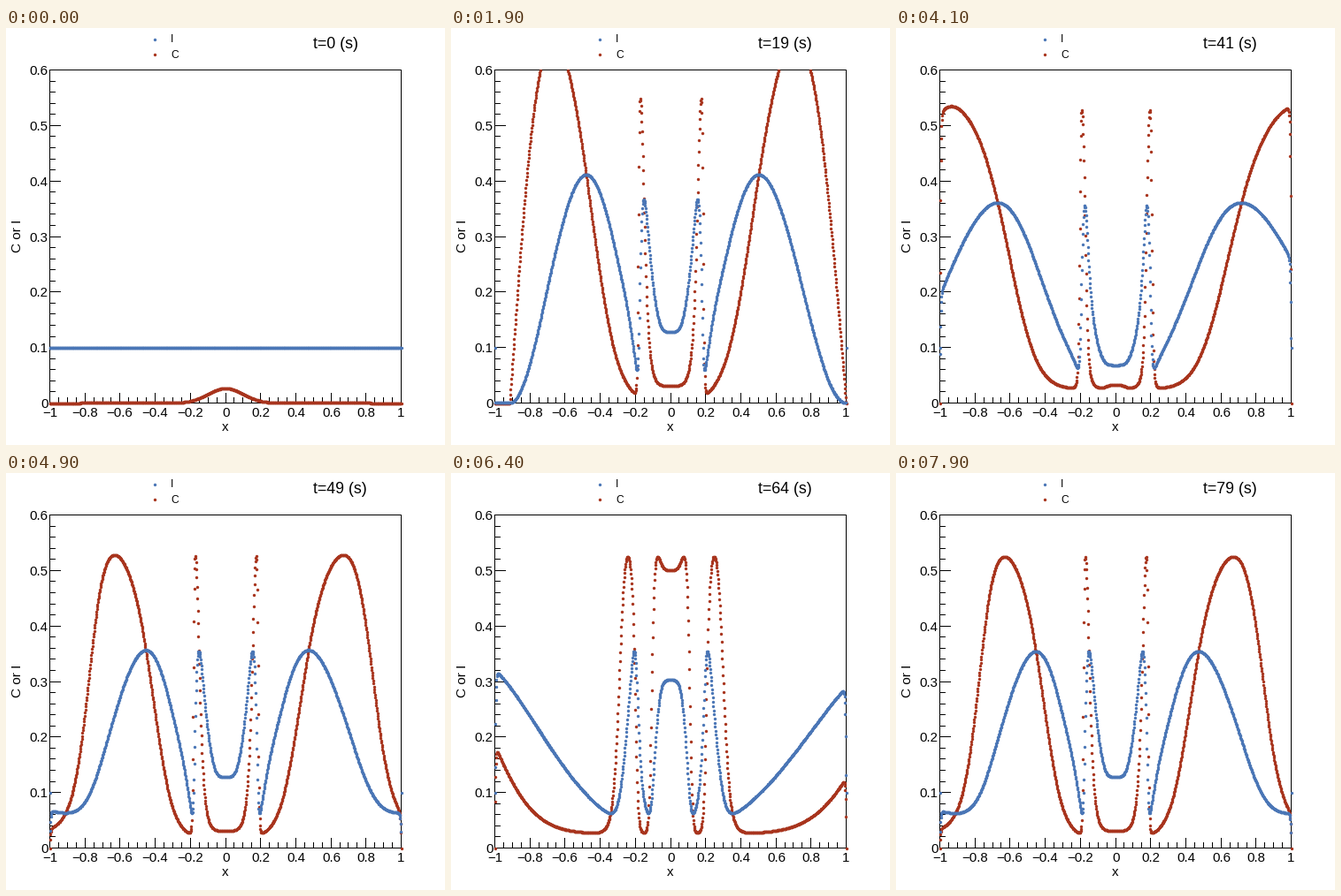
These frames come from a looping animation (496 by 472 pixels, 8000 ms). A matplotlib script:

```python
import numpy as np
import matplotlib.pyplot as plt
from matplotlib.animation import FuncAnimation

W, H, DPI = 496, 472, 100
BLUE, RED = "#4a76b6", "#a8341d"
FRAMES, SUB = 80, 10
PERIOD, RATE = 10, 0.46
FLOOR = .0265


def sigmoid(u):
    return 1 / (1 + np.exp(-np.clip(u, -60, 60)))


def delay(r):
    """Lag of the pulse at distance r: logarithmic outside a fast core."""
    far = 11.38 + 5.1 * np.log((r ** 4 + .086 ** 4) ** .25)
    return far - 5.4 * sigmoid((.182 - r) / .018)


def train(age, start, gain=0):
    """Periodic pulses, the first ones stronger by the given gain."""
    n, phase = np.divmod(age + 3, PERIOD)
    phase -= 3
    pulse = .548 * sigmoid((phase + 1.12) / .3) * sigmoid((1.95 - phase) / .75)
    boost = 1 + gain * 3. ** (start - np.maximum(n, start))
    return np.where(n >= start, pulse * boost, 0)


def first_pulse(age):
    """Strong pulse with a sharp front running into the empty region."""
    rise = np.tanh(np.maximum(age + 1.93, 0))
    base = .015 + (FLOOR - .015) * sigmoid((age - 8.3) / .3)
    return rise * (base + .82 * sigmoid((1.3 - age) / .95))


x = np.linspace(-1, 1, 1001)
grid = np.linspace(0, 1.1, 400)
stretch = grid * (1 + .11 * np.maximum(grid - .08, 0))
dist = np.where(x > 0, np.interp(x, stretch, grid), -x)
peak = delay(dist) + PERIOD
seed = np.exp(-50 * x ** 2)
rim = np.arange(len(x))
edge = 1 - np.exp(-.6 * np.minimum(rim, rim[::-1]))


def c_at(t):
    age = t - peak
    warm = FLOOR + train(age, 0)
    cold = first_pulse(age) + train(age, 1, .06)
    return (cold + seed * (warm - cold)) * edge


def simulate():
    """I relaxes towards C at every point."""
    dt = 1 / SUB
    keep = np.exp(-RATE * dt)
    inh = np.full_like(x, .1)
    out = []
    for n in range((FRAMES - 1) * SUB + 1):
        if n % SUB == 0:
            out.append((c_at(n * dt), inh.copy()))
        c = c_at((n + .5) * dt)
        inh = c + (inh - c) * keep
        inh[[0, -1]] = .1
    return out


states = simulate()

X0, X1, Y0, Y1 = 49.5, 446.5, 424.5, 47.5


def px(v):
    return (X0 + X1) / 2 + v * (X1 - X0) / 2


def py(v):
    return Y0 + (Y1 - Y0) * v / .6


fig = plt.figure(figsize=(W / DPI, H / DPI), dpi=DPI, facecolor="white")
ax = fig.add_axes([0, 0, 1, 1])
ax.set(xlim=(0, W), ylim=(H, 0))
ax.axis("off")


def text(tx, ty, s, size, ha="center", **kw):
    return ax.text(tx, ty, s, fontsize=size * 72 / DPI, ha=ha,
                   family="Liberation Sans", color="black", **kw)


def line(xs, ys):
    ax.plot(xs, ys, color="black", lw=72 / DPI, zorder=1, snap=False,
            solid_capstyle="projecting", solid_joinstyle="miter")


def dots(color, z, xs=(), ys=()):
    return ax.plot(xs, ys, "o", color=color, ms=3.4 * 72 / DPI, mew=0,
                   zorder=z)[0]


line([X0, X1, X1, X0, X0], [Y0, Y0, Y1, Y1, Y0])
for n in range(31):
    y = np.floor(py(n * .02)) + .5
    line([X0, X0 + (6 if n % 5 else 12)], [y, y])
    if n % 5 == 0:
        text(47.5, y + 5.5, f"{n * .02:.1g}", 15, "right")
for n in range(-20, 21):
    u = np.floor(px(n * .05)) + .5
    line([u, u], [Y0, Y0 - (6 if n % 4 else 11)])
    if n % 4 == 0:
        text(u, 440, f"{n * .05:.1g}".replace("-", "\u2212"), 15)

text(248, 455.5, "x", 15)
text(12.8, 235, "C or I", 15.4, rotation=90, va="center")
dots(BLUE, 2, [167.5], [12.5])
dots(RED, 2, [167.5], [29.5])
text(186, 16.5, "I", 12, "left")
text(186, 33.5, "C", 12, "left")
clock = text(347, 23, "", 17.8, "left")

c_dots = dots(RED, 3)
i_dots = dots(BLUE, 4)


def draw(n):
    c, inh = states[n]
    c_dots.set_data(px(x), py(np.where(c > .6, np.nan, c)))
    i_dots.set_data(px(x), py(inh))
    clock.set_text(f"t={n} (s)")
    return c_dots, i_dots, clock


anim = FuncAnimation(fig, draw, frames=FRAMES, interval=100, repeat=True,
                     repeat_delay=0)
plt.show()
```
